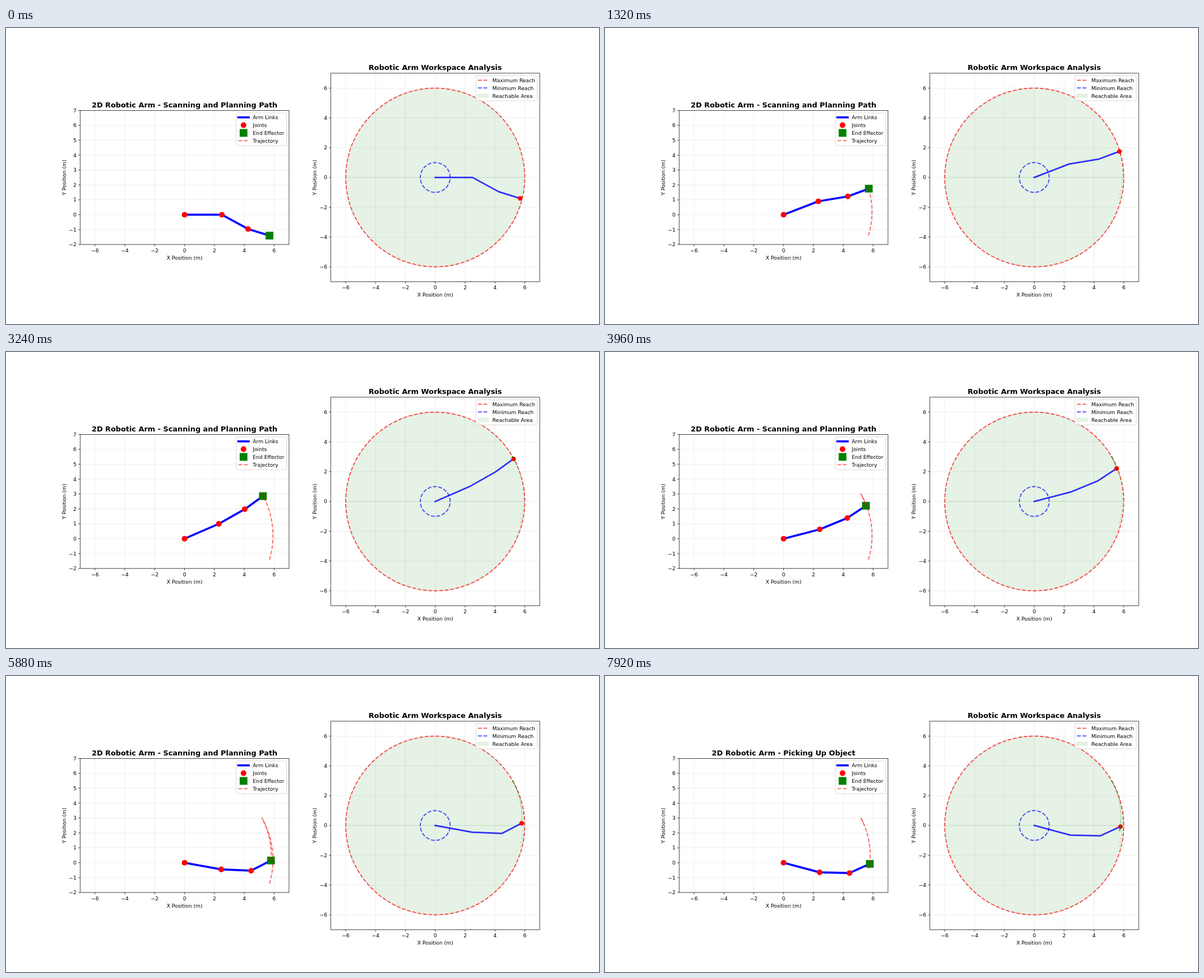
Write an HTML page that moves like this. It is 1058 px wide and 529 px high and loops after 8000 ms.

```html
<!DOCTYPE html>
<html lang="en">
<head>
<meta charset="utf-8">
<title>Robotic arm</title>
<style>
  html, body { margin: 0; width: 100%; height: 100%; overflow: hidden; background: #fff; }
  svg { display: block; width: 1058px; height: 529px; }
  text { font: 9.184px "DejaVu Sans", sans-serif; fill: #000; }
  .title { font-size: 12.86px; font-weight: bold; }
  .mid { text-anchor: middle; }
  .end { text-anchor: end; }
</style>
</head>
<body>
<svg id="stage" viewBox="0 0 1058 529"></svg>
<script>
const PT = 0.9184, UNIT = 26.62, STEP = 120, STEPS = 67, LOOP = 8000;
const TRAIL = 50, PICK_FROM = 50;
const LINKS = [2.5, 2, 1.5];
const DASH = `${3.7 * 2 * PT} ${1.6 * 2 * PT}`;
const stage = document.getElementById('stage');

// Joint angles in radians at chosen steps
const KEYS = [0, 7, 11, 17, 22, 27, 39, 49, 56, 60, 66];
const ANGLES = [
  [0, .22, .369, .47, .477, .41, .086, -.181, -.281, -.3, -.261],
  [-.5, -.325, -.205, -.06, .04, .105, .151, .138, .156, .18, .236],
  [.2, .205, .19, .13, .1, .11, .3, .518, .58, .56, .45]
];

function add(name, attrs, text) {
  const node = document.createElementNS('http://www.w3.org/2000/svg', name);
  for (const key in attrs) node.setAttribute(key, attrs[key]);
  if (text) node.textContent = text;
  return stage.appendChild(node);
}
const line = (x1, y1, x2, y2, stroke, pt, more) =>
  add('line', { x1, y1, x2, y2, stroke, 'stroke-width': pt * PT, ...more });
const label = (x, y, text, cls = '', more) => add('text', { x, y, class: cls, ...more }, text);
const path = (d, stroke, pt, more) =>
  add('path', { d, fill: 'none', stroke, 'stroke-width': pt * PT, 'stroke-linejoin': 'round', ...more });
const dot = (cx, cy, r, more) => add('circle', { cx, cy, r, fill: '#f00', ...more });
const square = (cx, cy) =>
  add('rect', { x: cx - 6.9, y: cy - 6.9, width: 13.8, height: 13.8, fill: '#008000' });

function makeAxes(left, top, rows, yMin, ticks) {
  const width = 14 * UNIT, height = rows * UNIT, bottom = top + height;
  const ax = { left, top, width, height, bottom, ox: left + 7 * UNIT, oy: bottom + yMin * UNIT };
  ax.at = ([x, y]) => [ax.ox + x * UNIT, ax.oy - y * UNIT];
  ax.xs = [-6, -4, -2, 0, 2, 4, 6];
  ax.ys = ticks;
  return ax;
}

function drawGrid(ax) {
  const grid = { 'stroke-opacity': .3 };
  for (const v of ax.xs) {
    const x = ax.ox + v * UNIT;
    line(x, ax.top, x, ax.bottom, '#b0b0b0', .8, grid);
  }
  for (const v of ax.ys) {
    const y = ax.oy - v * UNIT;
    line(ax.left, y, ax.left + ax.width, y, '#b0b0b0', .8, grid);
  }
}

function drawFrame(ax) {
  const num = v => String(v).replace('-', '\u2212');
  add('rect', { x: ax.left, y: ax.top, width: ax.width, height: ax.height,
    fill: 'none', stroke: '#000', 'stroke-width': .8 * PT });
  for (const v of ax.xs) {
    const x = ax.ox + v * UNIT;
    line(x, ax.bottom, x, ax.bottom + 3.2, '#000', .8);
    label(x, ax.bottom + 14, num(v), 'mid');
  }
  for (const v of ax.ys) {
    const y = ax.oy - v * UNIT;
    line(ax.left - 3.2, y, ax.left, y, '#000', .8);
    label(ax.left - 6.4, y + 3.35, num(v), 'end');
  }
  label(ax.ox, ax.bottom + 27, 'X Position (m)', 'mid');
  const x = ax.left - 25.7, y = ax.top + ax.height / 2;
  label(x, y, 'Y Position (m)', 'mid', { transform: `rotate(-90 ${x} ${y})` });
}

function legend(x, y, width, height, rows) {
  add('rect', { x, y, width, height, rx: 1.8, fill: '#fff', 'fill-opacity': .8,
    stroke: '#ccc', 'stroke-opacity': .8, 'stroke-width': PT });
  rows.forEach(([text, draw], i) => {
    const cy = y + 7.8 + i * 13.9;
    draw(x + 3.7, cy);
    label(x + 29.4, cy + 3.4, text);
  });
}
const sample = (color, pt, more) => (x, y) => line(x, y, x + 18.4, y, color, pt, more);

function ring(ax, radius, stroke) {
  const r = radius * UNIT, { ox, oy } = ax;
  path(`M${ox + r} ${oy}A${r} ${r} 0 0 0 ${ox - r} ${oy}A${r} ${r} 0 0 0 ${ox + r} ${oy}`,
    stroke, 2, { 'stroke-dasharray': DASH, 'stroke-opacity': .7 });
}

// Cubic curve through the keyed angles
function curve(vals, k) {
  const last = KEYS.length - 1;
  let i = 0;
  while (i < last - 1 && k > KEYS[i + 1]) i++;
  const slope = j => {
    const a = Math.max(0, j - 1), b = Math.min(last, j + 1);
    return (vals[b] - vals[a]) / (KEYS[b] - KEYS[a]);
  };
  const h = KEYS[i + 1] - KEYS[i], u = (k - KEYS[i]) / h, w = 1 - u;
  return vals[i] * w * w * (1 + 2 * u) + vals[i + 1] * u * u * (3 - 2 * u)
    + h * u * w * (slope(i) * w - slope(i + 1) * u);
}

function pose(k) {
  let x = 0, y = 0, angle = 0;
  const points = [[0, 0]];
  LINKS.forEach((length, i) => {
    angle += curve(ANGLES[i], k);
    points.push([x += length * Math.cos(angle), y += length * Math.sin(angle)]);
  });
  return points;
}
const poses = Array.from({ length: STEPS }, (_, k) => pose(k));
const toPath = (ax, points) => 'M' + points.map(p => ax.at(p).map(v => v.toFixed(2)).join(' ')).join('L');

// Left plot
const armAx = makeAxes(132.25, 147.35, 9, -2, [-2, -1, 0, 1, 2, 3, 4, 5, 6, 7]);
drawGrid(armAx);
const arm = path('', '#00f', 4, { 'stroke-linecap': 'square' });
const joints = [0, 1, 2].map(() => dot(0, 0, 5.05));
const hand = square(0, 0);
const trailLook = { 'stroke-dasharray': DASH, 'stroke-opacity': .6 };
const trail = path('', '#f00', 2, trailLook);
drawFrame(armAx);
const title = label(armAx.ox, 141.8, ' ', 'title mid');
legend(410.9, 151.9, 89.5, 58.4, [
  ['Arm Links', sample('#00f', 4, { 'stroke-linecap': 'square' })],
  ['Joints', (x, y) => dot(x + 9.2, y, 5.05)],
  ['End Effector', (x, y) => square(x + 9.2, y)],
  ['Trajectory', sample('#f00', 2, trailLook)]
]);

// Right plot
const reachAx = makeAxes(579.5, 80.8, 14, -7, [-6, -4, -2, 0, 2, 4, 6]);
const R = 6 * UNIT;
const area = { fill: '#008000', 'fill-opacity': .1, stroke: '#008000', 'stroke-opacity': .1, 'stroke-width': PT };
add('circle', { cx: reachAx.ox, cy: reachAx.oy, r: R, ...area });
line(reachAx.ox - R, reachAx.oy, reachAx.ox + R, reachAx.oy, '#008000', 1, { 'stroke-opacity': .15 });
drawGrid(reachAx);
ring(reachAx, 6, '#f00');
ring(reachAx, 1, '#00f');
const reachArm = path('', '#00f', 3, { 'stroke-linecap': 'square', 'stroke-opacity': .8 });
const tip = dot(0, 0, 4.15);
const marks = poses.map(p => {
  const [x, y] = reachAx.at(p[3]);
  return dot(x, y, .8, { fill: '#008000', 'fill-opacity': .6 });
});
drawFrame(reachAx);
label(reachAx.ox, 75.3, 'Robotic Arm Workspace Analysis', 'title mid');
legend(838.4, 85.5, 109.4, 44.6, [
  ['Maximum Reach', sample('#f00', 2, { 'stroke-dasharray': DASH, 'stroke-opacity': .7 })],
  ['Minimum Reach', sample('#00f', 2, { 'stroke-dasharray': DASH, 'stroke-opacity': .7 })],
  ['Reachable Area', (x, y) => add('rect', { x, y: y - 3.2, width: 18.4, height: 6.4, ...area })]
]);

function moveTo(node, ax, point) {
  const [x, y] = ax.at(point);
  node.setAttribute('transform', `translate(${x} ${y})`);
}

function show(k) {
  const points = poses[k];
  arm.setAttribute('d', toPath(armAx, points));
  reachArm.setAttribute('d', toPath(reachAx, points));
  joints.forEach((joint, i) => moveTo(joint, armAx, points[i]));
  moveTo(hand, armAx, points[3]);
  moveTo(tip, reachAx, points[3]);
  const past = poses.slice(Math.max(0, k + 1 - TRAIL), k + 1).map(p => p[3]);
  trail.setAttribute('d', toPath(armAx, past));
  marks.forEach((mark, i) => mark.setAttribute('visibility', i <= k ? 'visible' : 'hidden'));
  title.textContent = '2D Robotic Arm - ' + (k < PICK_FROM ? 'Scanning and Planning Path' : 'Picking Up Object');
}

const start = performance.now();
let shown = -1;
function tick() {
  const t = (performance.now() - start) % LOOP;
  const k = Math.min(STEPS - 1, Math.floor(t / STEP));
  if (k !== shown) show(shown = k);
  requestAnimationFrame(tick);
}
tick();
</script>
</body>
</html>
```
